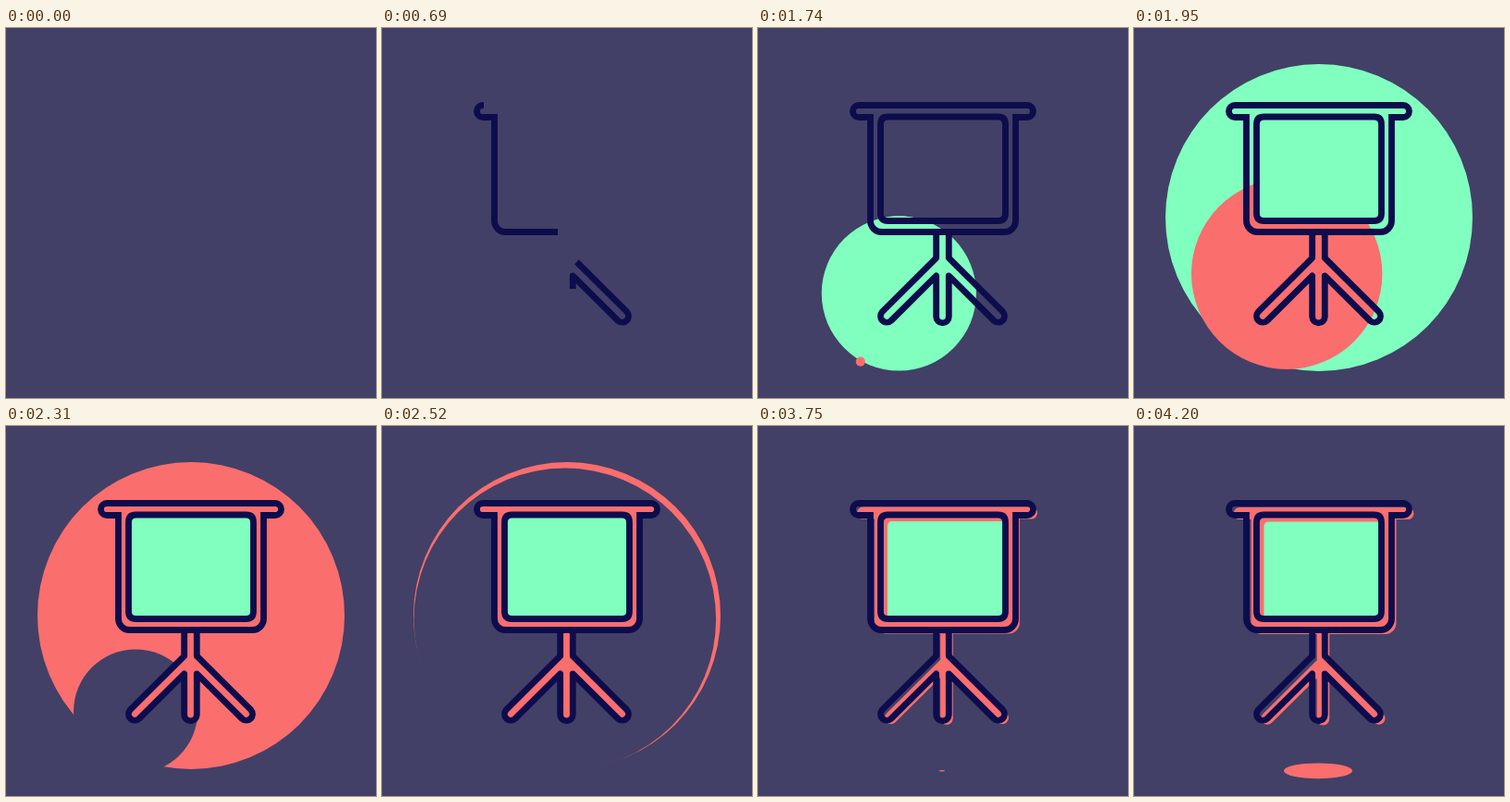
These frames come from a looping animation (400 by 400 pixels, 4.5 s). An HTML page:

```html
<!DOCTYPE html>
<html lang="en">
<head>
<meta charset="utf-8">
<title>Presentation screen</title>
<style>
  html, body { margin: 0; width: 100%; height: 100%; overflow: hidden; background: #424066; }
  svg { display: block; width: 100vw; height: 100vh; }
  .line { fill: none; stroke: #0d0c4c; stroke-width: 6.8; }
  .coral { fill: #fa6e6e; }
  .green { fill: #80ffbf; }
  .back { fill: #424066; }
</style>
</head>
<body>
<svg viewBox="0 0 400 400">
  <defs>
    <path id="board" pathLength="1" d="M110 83.5H109A6.5 6.5 0 0 0 109 96.5H121.5V208.5A12 12 0 0 0 133.5 220.5H266.5A12 12 0 0 0 278.5 208.5V96.5H291A6.5 6.5 0 0 0 291 83.5Z"/>
    <path id="stand" pathLength="1" d="M206.3 282V267.9L255.2 316.5A6.8 6.8 0 0 0 264.8 306.9L206.3 248.7V220.5H192.7V248.7L134.2 306.9A6.8 6.8 0 0 0 143.8 316.5L192.7 267.9V312A6.8 6.8 0 0 0 206.3 312Z"/>
    <path id="screen" pathLength="1" d="M140.5 96Q132.5 96 132.5 104V200.5Q132.5 208.5 140.5 208.5H259.5Q267.5 208.5 267.5 200.5V104Q267.5 96 259.5 96Z"/>
    <clipPath id="greenClip"><circle id="greenHole"/></clipPath>
    <clipPath id="coralClip"><circle id="coralHole"/></clipPath>
  </defs>
  <rect class="back" width="400" height="400"/>
  <circle id="greenDisc" class="green"/>
  <circle id="coralDisc" class="coral"/>
  <circle id="backDisc" class="back"/>
  <g clip-path="url(#coralClip)">
    <g class="coral shift"><use href="#board"/><use href="#stand"/></g>
  </g>
  <g clip-path="url(#greenClip)">
    <rect class="green shift" x="135.5" y="99" width="129" height="107" rx="5"/>
  </g>
  <ellipse id="shadow" class="coral" cx="199" cy="372.8"/>
  <use id="standLine" class="line" href="#stand" stroke-linejoin="round"/>
  <use id="boardLine" class="line" href="#board"/>
  <use id="screenLine" class="line" href="#screen"/>
</svg>
<script>
const LOOP = 4500;
const $ = id => document.getElementById(id);
const shifted = document.querySelectorAll('.shift');

const span = (t, from, to) => Math.min(1, Math.max(0, (t - from) / (to - from)));
const smooth = p => p * p * (3 - 2 * p);
const gentle = p => (p + smooth(p)) / 2;

function set(el, attrs) {
  for (const name in attrs) el.setAttribute(name, attrs[name]);
}

function trim(id, p) {
  const dash = p >= 1 ? 'none' : `${p} 2`;
  set($(id), { 'stroke-dasharray': dash, visibility: p > 0 ? 'visible' : 'hidden' });
}

// Grows a disc from a point at the lower left to the full centred size.
function grow(id, p, x, y, r = 166) {
  set($(id), { cx: x + (200 - x) * p, cy: y + (205 - y) * p, r: r * p });
}

function render(t) {
  const outline = gentle(span(t, 450, 1095));
  trim('boardLine', outline);
  trim('standLine', outline);
  trim('screenLine', gentle(span(t, 780, 1510)));

  const green = smooth(span(t, 1530, 1950));
  const coral = smooth(span(t, 1695, 2135));
  const back = smooth(span(t, 2120, 2560));
  const cleared = back >= 1;
  grow('greenHole', green, 104, 370);
  grow('coralHole', coral, 108, 365.5);
  grow('greenDisc', cleared || coral >= 1 ? 0 : green, 104, 370);
  grow('coralDisc', cleared ? 0 : coral, 108, 365.5);
  grow('backDisc', cleared ? 0 : back, 100, 378, 167);

  const move = smooth(span(t, 3400, 3840));
  shifted.forEach(el => set(el, { transform: `translate(${5 * move} ${4.6 * move})` }));

  const size = 1.08 * smooth(span(t, 3700, 3990)) - 0.08 * smooth(span(t, 3990, 4210));
  set($('shadow'), { rx: 37 * size, ry: 8.4 * size });
}

const start = performance.now();
function tick() {
  render((performance.now() - start) % LOOP);
  requestAnimationFrame(tick);
}
render(0);
requestAnimationFrame(tick);
</script>
</body>
</html>
```
